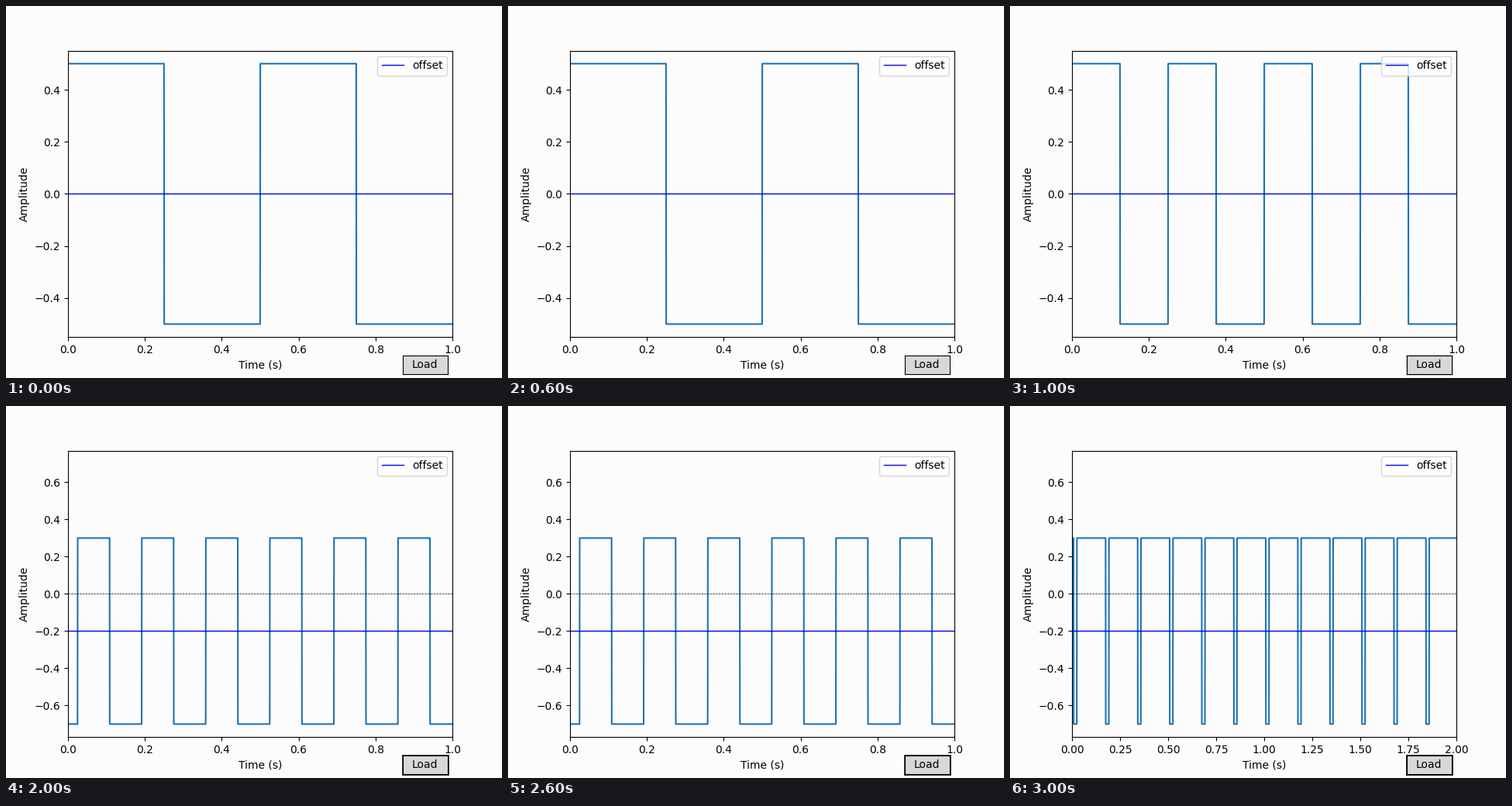
A matplotlib script for the animation above (4 s loop, 640 by 480 pixels).

```python
import matplotlib.pyplot as plt
import numpy as np
from matplotlib.animation import FuncAnimation
from matplotlib.patches import Rectangle

PAPER = "#fcfcfc"
BLUE = "#0000fc"
SAMPLES = 5000
BUTTON_BOX = (0.8, 0.01, 0.09, 0.05)

# frequency, duty cycle, time shift, offset, duration, button halo opacity
STATES = [
    (2, 0.5, 0.0, 0.0, 1, 0.0),
    (4, 0.5, 0.0, 0.0, 1, 0.15),
    (6, 0.5, 0.025, -0.2, 1, 0.75),
    (6, 0.9, 0.025, -0.2, 2, 0.85),
]


def square_wave(t, freq, duty, shift, offset):
    phase = ((t - shift) * freq + 1e-9) % 1
    return np.where(phase < duty, 0.5, -0.5) + offset


plt.rcParams["font.family"] = "DejaVu Sans"
fig, ax = plt.subplots(figsize=(6.4, 4.8), dpi=100, facecolor=PAPER)
ax.set_facecolor(PAPER)
ax.set_xlabel("Time (s)")
ax.set_ylabel("Amplitude")

wave, = ax.plot([], [], color="#1c74b4", lw=1.5)
ax.axhline(0, color="black", lw=0.5, ls="--")
offset_line = ax.axhline(0, color=BLUE, lw=1, label="offset")
ax.legend(loc="upper right")

# Soft outer ring under the button; the button face hides its inner part.
halo = Rectangle(BUTTON_BOX[:2], *BUTTON_BOX[2:], transform=fig.transFigure,
                 fill=False, edgecolor="black", lw=2.16, zorder=-1)
fig.add_artist(halo)
button = fig.add_axes(BUTTON_BOX, facecolor="#d8d8d8", xticks=[], yticks=[])
button.text(0.5, 0.5, "Load", ha="center", va="center",
            transform=button.transAxes)


def update(index):
    freq, duty, shift, offset, duration, halo_alpha = STATES[index]
    t = np.linspace(0, duration, SAMPLES, endpoint=False)
    wave.set_data(t, square_wave(t, freq, duty, shift, offset))
    offset_line.set_ydata([offset, offset])
    limit = 1.1 * (0.5 + abs(offset))
    ax.set_xlim(0, duration)
    ax.set_ylim(-limit, limit)
    halo.set_alpha(halo_alpha)
    return wave, offset_line, halo


anim = FuncAnimation(fig, update, frames=len(STATES), interval=1000,
                     repeat=True, repeat_delay=0)
plt.show()
```
